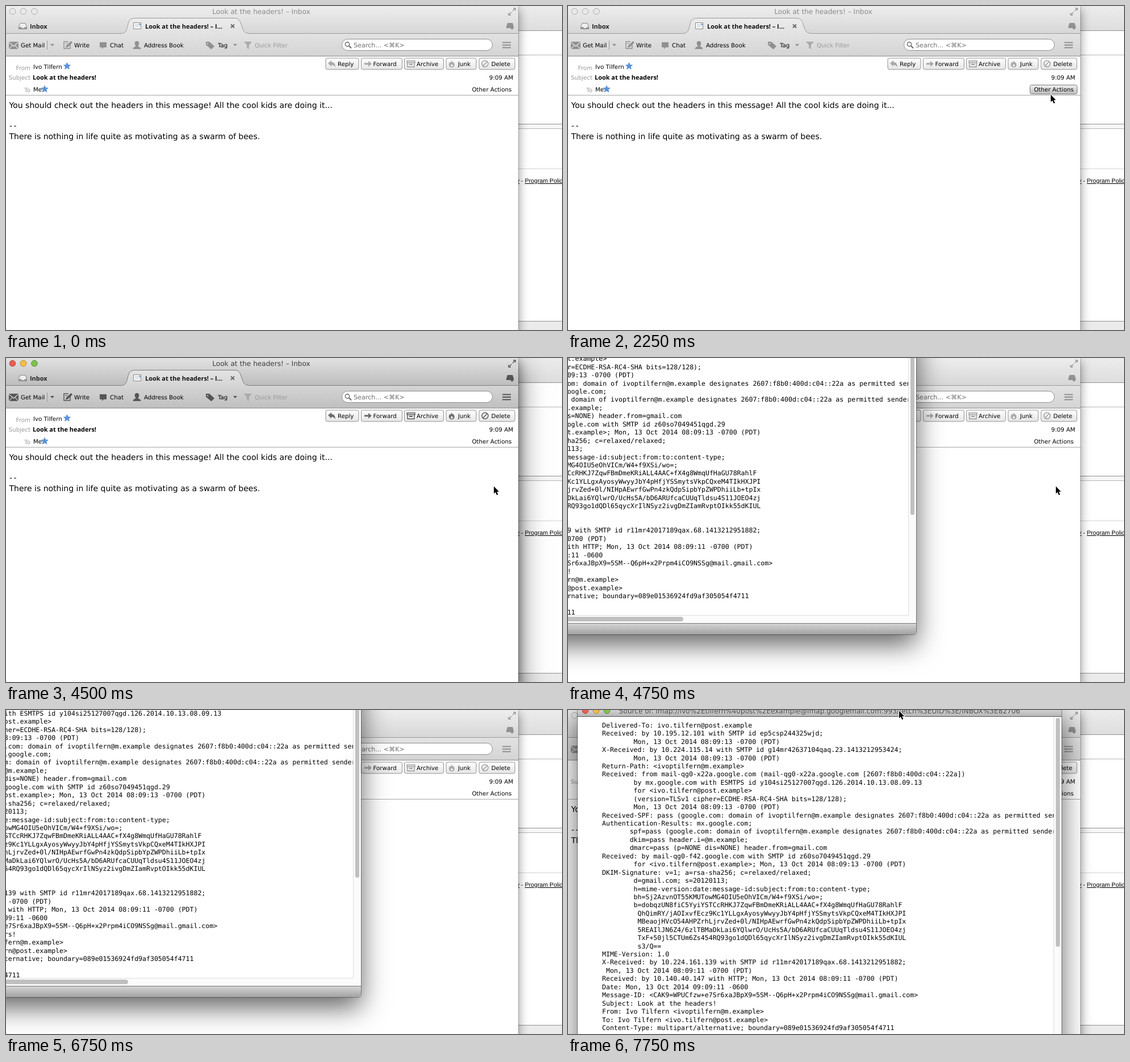
An HTML page that plays this animation: 979 px wide and 572 px high, repeating every 8 s.

```html
<!DOCTYPE html>
<html lang="en">
<head>
<meta charset="utf-8">
<title>Message headers</title>
<style>
html, body { margin: 0; width: 100%; height: 100%; overflow: hidden; background: #fff; }
#stage { position: relative; width: 979px; height: 572px; overflow: hidden;
  font: 10.25px "DejaVu Sans", sans-serif; text-rendering: geometricPrecision; }
#stage > * { position: absolute; }
svg { display: block; }

#main { left: -2px; top: -2px; width: 904px; height: 620px; background: #fff;
  box-shadow: 0 0 0 1px rgba(0,0,0,.18), 0 7px 17px rgba(0,0,0,.45); }
#main > * { position: absolute; left: 2px; top: 2px; }
#main .glow { left: 0; top: 0; width: 904px; height: 620px;
  box-shadow: 0 18px 47px rgba(0,0,0,.6); }
.bold { font: 700 10.95px "Open Sans", sans-serif; }
.title { font-size: 12.1px; }
.body { font-size: 14px; }
.gray { fill: #999; }
.ic { fill: #555; stroke: none; }
.ln { fill: none; stroke: #555; stroke-width: 1.4; }
.btn { fill: url(#btn); stroke: #919191; }

/* focus and hover states */
.on, .dim, .hover, #menu, #menu p, #src, #cursor { animation: 8s step-end infinite; }
.on { --off: 0; animation-name: active; }
.dim { --off: .55; animation-name: active; }
.hover { animation-name: hover; }
@keyframes active { 0%, 59.375% { opacity: var(--off); } 31.25% { opacity: 1; } }
@keyframes hover { 0%, 56.25% { opacity: 0; } 25% { opacity: 1; } }

#menu { left: 813px; top: 157px; width: 190px; height: 144px; padding-top: 2px;
  border-radius: 0 0 5px 5px; background: rgba(255,255,255,.97); font-size: 12.93px;
  box-shadow: 0 0 0 1px rgba(0,0,0,.12), 0 6px 14px rgba(0,0,0,.5); animation-name: menu; }
#menu p { margin: 0; padding-left: 21px; height: 18.3px; line-height: 18.3px; white-space: nowrap; }
#menu hr { margin: 5px 0 6px; border: 0; height: 1px; background: #dcdcdc; }
#menu { --lit: linear-gradient(#5186f6, #1b56e8); }
#menu .conv { animation-name: conv; }
#menu .tab { animation-name: tab; }
#menu .view { animation-name: view; }
@keyframes menu { 0%, 56.25% { opacity: 0; } 31.25% { opacity: 1; } }
@keyframes conv { 0%, 46.875% { color: #000; background: none; } 43.75% { color: #fff; background: var(--lit); } }
@keyframes tab { 0%, 50% { color: #000; background: none; } 46.875% { color: #fff; background: var(--lit); } }
@keyframes view { 0%, 56.25% { color: #000; background: none; } 50% { color: #fff; background: var(--lit); } }

#src { left: 17px; top: -9px; width: 852px; height: 638px; border-radius: 5px; background: #fbfbfb;
  box-shadow: 0 0 0 1px rgba(0,0,0,.35), 0 18px 47px rgba(0,0,0,.62); animation-name: src; }
#src > * { position: absolute; }
#src .bar { width: 852px; height: 20px; border-radius: 5px 5px 0 0; border-bottom: 1px solid #555;
  background: linear-gradient(#e8e8e8, #b6b6b6); }
#src .foot { top: 618px; width: 852px; height: 19px; border-radius: 0 0 5px 5px; border-top: 1px solid #777;
  background: linear-gradient(#d4d4d4, #a2a2a2); }
#src .name { top: 3px; width: 852px; text-align: center; line-height: 16px; white-space: nowrap; color: #4c4c4c; }
#src .doc { top: 21px; width: 838px; height: 583px; overflow: hidden; background: #fff;
  border: solid #ddd; border-width: 0 1px 1px 0; }
#src .thumb { border-radius: 4px; background: #c0c0c0; }
pre { margin: 7.8px 0 0 43px; font: 11.55px/14.43px "DejaVu Sans Mono", monospace; }
@keyframes src {
  0% { opacity: 0; }
  59.375% { opacity: 1; transform: translate(-256px, -141px); }
  75% { opacity: 1; transform: translate(-248px, -127px); }
  84.375% { opacity: 1; transform: translate(-244px, -122px); }
  87.5% { opacity: 1; transform: translate(-179px, -60px); }
  90.625% { opacity: 1; transform: translate(-115px, -11px); }
  93.75% { opacity: 1; transform: translate(-42px, -4px); }
  96.875%, 100% { opacity: 1; transform: none; }
}

#cursor { left: 0; top: 0; overflow: visible; animation-name: cursor; }
@keyframes cursor {
  0% { opacity: 0; }
  6.25% { opacity: 1; transform: translate(848px, 352px); }
  9.375% { opacity: 1; transform: translate(827px, 178px); }
  12.5% { opacity: 1; transform: translate(832px, 165px); }
  18.75% { opacity: 1; transform: translate(830px, 170px); }
  21.875% { opacity: 1; transform: translate(847px, 164px); }
  25% { opacity: 1; transform: translate(848px, 156px); }
  28.125% { opacity: 1; transform: translate(848px, 155px); }
  43.75% { opacity: 1; transform: translate(850px, 174px); }
  46.875% { opacity: 1; transform: translate(854px, 220px); }
  50% { opacity: 1; transform: translate(856px, 230px); }
  56.25% { opacity: 1; transform: translate(857px, 225px); }
  65.625% { opacity: 1; transform: translate(713px, 140px); }
  68.75% { opacity: 1; transform: translate(631px, 96px); }
  75% { opacity: 0; }
  90.625% { opacity: 1; transform: translate(464px, -11px); }
  93.75% { opacity: 1; transform: translate(539px, -4px); }
  96.875%, 100% { opacity: 1; transform: translate(581px, 0); }
}
</style>
</head>
<body>
<div id="stage">

<svg width="979" height="572">
  <defs>
    <linearGradient id="page" x2="0" y2="1"><stop stop-color="#ececec"/><stop offset="1" stop-color="#dedede"/></linearGradient>
  </defs>
  <path fill="#fff" d="M880 0h99v572h-99z"/>
  <path fill="url(#page)" d="M880 0h99v43h-99z"/>
  <path fill="#f6f6f6" d="M880 209h99v7h-99z"/>
  <path fill="#ebebeb" d="M880 557h99v15h-99z"/>
  <path stroke="#8f8f8f" d="M880 43.5h99M880 208.5h99M880 556.5h99"/>
  <path stroke="#b5b5b5" d="M880 86.5h99M880 216.5h99"/>
  <path stroke="#d2d2d2" d="M880 287.5h99"/>
  <text x="898.8" y="312" font-family="Liberation Sans, sans-serif" font-size="10.6"><tspan text-decoration="underline">y</tspan> - <tspan text-decoration="underline">Program Policies</tspan></text>
</svg>

<div id="main">
  <div class="glow on"></div>
  <svg width="902" height="572">
    <defs>
      <linearGradient id="top" x2="0" y2="1"><stop stop-color="#eee"/><stop offset="1" stop-color="#d6d6d6"/></linearGradient>
      <linearGradient id="topOn" x2="0" y2="1"><stop stop-color="#e2e2e2"/><stop offset="1" stop-color="#bcbcbc"/></linearGradient>
      <linearGradient id="tool" x2="0" y2="1"><stop stop-color="#ececec"/><stop offset="1" stop-color="#d4d4d4"/></linearGradient>
      <linearGradient id="toolOn" x2="0" y2="1"><stop stop-color="#e4e4e4"/><stop offset="1" stop-color="#bfbfbf"/></linearGradient>
      <linearGradient id="btn" x2="0" y2="1"><stop stop-color="#fefefe"/><stop offset="1" stop-color="#e6e6e6"/></linearGradient>
      <linearGradient id="btnOn" x2="0" y2="1"><stop stop-color="#f0f0f0"/><stop offset="1" stop-color="#bdbdbd"/></linearGradient>
      <path id="strip" d="M-2 48.5H202C211 48.5 212 43 214 36C216 26 218 21.5 228 21.5H403C412 21.5 413 30 416 38C418 45 421 48.5 430 48.5H905V88.5H-2Z"/>
      <path id="star" d="M0-6L1.7-2L6-1.7L2.8 1.1L3.8 5.4L0 3.1L-3.8 5.4L-2.8 1.1L-6-1.7L-1.7-2Z" fill="#5b94e0" stroke="#3a6fc0" stroke-width=".6"/>
    </defs>

    <path fill="#fff" d="M0 0h902v572H0z"/>
    <path fill="url(#top)" d="M0 0h902v49H0z"/>
    <use href="#strip" fill="url(#tool)" stroke="#9a9a9a"/>
    <g fill="#e9e9e9" stroke="#a8a8a8"><circle cx="11.5" cy="9.5" r="5.3"/><circle cx="30.5" cy="9.5" r="5.3"/><circle cx="50" cy="9.5" r="5.3"/></g>
    <g class="on">
      <path fill="url(#topOn)" d="M0 0h902v49H0z"/>
      <use href="#strip" fill="url(#toolOn)" stroke="#7c7c7c"/>
      <g stroke-width=".9"><circle cx="11.5" cy="9.5" r="5.3" fill="#ea5d52" stroke="#a83c34"/><circle cx="30.5" cy="9.5" r="5.3" fill="#f3bd48" stroke="#ab7d22"/><circle cx="50" cy="9.5" r="5.3" fill="#7fc24b" stroke="#4e8428"/></g>
    </g>
    <path stroke="#8a8a8a" d="M0 88.5h902"/>

    <text class="title dim" x="449.5" y="14" text-anchor="middle" fill="#3c3c3c">Look at the headers! – Inbox</text>
    <text class="bold" x="42" y="39.5" fill="#222">Inbox</text>
    <text class="bold" x="245" y="39.5" fill="#111">Look at the headers! – I…</text>

    <!-- tab strip icons -->
    <path d="M25 30.5h9l2.500 6v4H22.500v-4z" fill="#eee" stroke="#888"/><path d="M23 37h4l1 2h4l1-2h3v3H23z" fill="#999"/>
    <path d="M224.500 29.500h13v11h-13z" fill="#fafafa" stroke="#888"/><path d="M227 33h6M227 36h8" stroke="#aab8cc"/><path d="M234 31h3v3h-3z" fill="#8fb1dc"/>
    <path d="M396 32.500l6 6m0-6l-6 6" stroke="#666" stroke-width="1.900"/>
    <g class="dim">
      <path class="ic" d="M883 30h9l2 6v3h-13v-3zM888 39h6l-3 3z"/>
      <path class="ln" stroke-width="1" d="M892 9l5-5m-4 0h4v4M890 11l-5 5m0-4v4h4"/>
    </g>

    <!-- toolbar -->
    <g class="dim">
      <path class="ic" d="M5 63h17l-8.500 7zM5 64.500l5.500 5L5 75zM22 64.500l-5.500 5L22 75zM11.300 70.200l2.200 1.800 2.200-1.800L21 76H6z"/>
      <path class="ic" d="M78 67h7l-3.500 4zM400 67h7l-3.500 4z"/>
      <path class="ln" d="M113 68v7h-11V63h8"/><path class="ic" d="M106 70l8.500-8 2.500 2.500-8 8-4 1zM104 66h4v1h-4z"/>
      <path class="ic" d="M165 64h12v9h-5l-3 3v-3h-4z"/>
      <path class="ic" d="M230.500 62c3 0 4 2 3.700 4.500-.2 2-1 3-1.700 4 0 2 5 1.500 5 5.500h-14c0-4 5-3.500 5-5.500-.7-1-1.500-2-1.700-4-.3-2.500.7-4.500 3.700-4.500z"/>
      <path class="ic" fill-rule="evenodd" d="M352 63h6l9 8-5.500 5.500-9.500-8zM355 65.200a1.200 1.200 0 1 0 .1 0z"/>
      <path class="ln" stroke-width="2.200" d="M874 64.500h15M874 69h15M874 73.500h15" style="stroke-width:2"/>
    </g>
    <path d="M72.500 61v16" stroke="#999"/>
    <path d="M419 63h14l-5.200 6v7l-3.600-2v-5z" fill="#aaa"/>
    <text x="26" y="73">Get Mail</text>
    <text x="120" y="73">Write</text>
    <text x="183" y="73">Chat</text>
    <text x="243" y="73">Address Book</text>
    <text x="373" y="73">Tag</text>
    <text x="438" y="73" fill="#999">Quick Filter</text>
    <rect x="591.500" y="58.500" width="265" height="20" rx="10" fill="#fff" stroke="#8e8e8e"/>
    <g fill="none" stroke="#666" stroke-width="1.400"><circle cx="601" cy="67.500" r="3.700"/><path d="M604 70.500l4 4" stroke-width="2"/></g>
    <text x="612" y="73" font-size="11.200" fill="#707070">Search... &lt;⌘K&gt;</text>

    <!-- message header -->
    <path stroke="#a6a6a6" d="M0 157.500h902"/>
    <g class="gray" text-anchor="end"><text x="43" y="112.500">From</text><text x="43" y="130">Subject</text><text x="43" y="152">To</text></g>
    <text x="48" y="110.500">Ivo Tilfern</text><use href="#star" x="107.500" y="106"/>
    <text class="bold" x="47" y="130">Look at the headers!</text>
    <text x="48" y="151">Me</text><use href="#star" x="68" y="146.500"/>
    <text x="893" y="130" text-anchor="end">9:09 AM</text>
    <rect class="hover" x="813.500" y="139.500" width="83" height="16" rx="3" fill="url(#btnOn)" stroke="#7b7b7b"/>
    <text x="820.500" y="151">Other Actions</text>

    <g class="btn">
      <rect x="563" y="92" width="58" height="20" rx="3"/><rect x="625.500" y="92" width="72" height="20" rx="3"/>
      <rect x="701.500" y="92" width="69" height="20" rx="3"/><rect x="775" y="92" width="53" height="20" rx="3"/>
      <rect x="833" y="92" width="63" height="20" rx="3"/>
    </g>
    <g class="dim">
      <path class="ic" d="M567 101l6-5v3c5 0 7 4 7 9-2-3-3.500-4-7-4v3z" opacity=".85"/>
      <path class="ic" d="M631 100.500h7V97l6 5-6 5v-3.500h-7z" opacity=".85"/>
      <path class="ln" d="M707 100v7.500h12V100M706 97h14v3h-14z"/><path class="ic" d="M710 102h6v2h-6z"/>
      <path class="ic" fill-rule="evenodd" d="M784 96c1 3 4 3 5 5 2 4-.5 7.500-4 7.500s-6-3-5-6.500c.5-1.500 1-2 1-3.500 1 .5 1.500 1 2 2 1-1.500 1-3 1-4.500zM785 102.500c-3 2-2.500 4.500 0 4.500s3-2.500 0-4.500z" opacity=".85"/>
      <g class="ln"><circle cx="843.500" cy="102" r="5.500"/><path d="M839.700 106l7.600-8"/></g>
    </g>
    <text x="584" y="106">Reply</text>
    <text x="646.500" y="106">Forward</text>
    <text x="723" y="106">Archive</text>
    <text x="796" y="106">Junk</text>
    <text x="854.500" y="106">Delete</text>

    <g class="body">
      <text x="5.500" y="180">You should check out the headers in this message! All the cool kids are doing it...</text>
      <text x="6" y="216" letter-spacing="2.500">--</text>
      <text x="5.500" y="235">There is nothing in life quite as motivating as a swarm of bees.</text>
    </g>
  </svg>
</div>

<div id="menu">
  <p class="conv">Open in Conversation</p>
  <p>Open in New Window</p>
  <p class="tab">Open in New Tab</p>
  <p class="view">View Source</p>
  <hr>
  <p>Mark as Unread</p>
  <p>Save as...</p>
  <p>Print...</p>
</div>

<div id="src">
  <div class="bar"></div>
  <svg width="70" height="20" stroke-width=".9"><circle cx="13.500" cy="10" r="5.300" fill="#ea5d52" stroke="#a83c34"/><circle cx="32.500" cy="10" r="5.300" fill="#f3bd48" stroke="#ab7d22"/><circle cx="51.500" cy="10" r="5.300" fill="#7fc24b" stroke="#4e8428"/></svg>
  <div class="name title">Source of: imap://ivo%2Etilfern%40post%2Eexample@imap.googlemail.com:993/fetch%3EUID%3E/INBOX%3E82706</div>
  <div class="doc"><pre>Delivered-To: ivo.tilfern@post.example
Received: by 10.195.12.101 with SMTP id ep5csp244325wjd;
        Mon, 13 Oct 2014 08:09:13 -0700 (PDT)
X-Received: by 10.224.115.14 with SMTP id g14mr42637104qaq.23.1413212953424;
        Mon, 13 Oct 2014 08:09:13 -0700 (PDT)
Return-Path: &lt;ivoptilfern@m.example&gt;
Received: from mail-qg0-x22a.google.com (mail-qg0-x22a.google.com [2607:f8b0:400d:c04::22a])
        by mx.google.com with ESMTPS id y104si25127007qgd.126.2014.10.13.08.09.13
        for &lt;ivo.tilfern@post.example&gt;
        (version=TLSv1 cipher=ECDHE-RSA-RC4-SHA bits=128/128);
        Mon, 13 Oct 2014 08:09:13 -0700 (PDT)
Received-SPF: pass (google.com: domain of ivoptilfern@m.example designates 2607:f8b0:400d:c04::22a as permitted sender)
Authentication-Results: mx.google.com;
       spf=pass (google.com: domain of ivoptilfern@m.example designates 2607:f8b0:400d:c04::22a as permitted sender)
       dkim=pass header.i=@m.example;
       dmarc=pass (p=NONE dis=NONE) header.from=gmail.com
Received: by mail-qg0-f42.google.com with SMTP id z60so7049451qgd.29
        for &lt;ivo.tilfern@post.example&gt;; Mon, 13 Oct 2014 08:09:13 -0700 (PDT)
DKIM-Signature: v=1; a=rsa-sha256; c=relaxed/relaxed;
        d=gmail.com; s=20120113;
        h=mime-version:date:message-id:subject:from:to:content-type;
        bh=Sj2AzvnOT55KMUTowMG4OIU5eOhVICm/W4+f9XSi/wo=;
        b=dobqzUN8fiC5YyiYSTCcRHKJ7ZqwFBmDmeKRiALL4AAC+fX4g8WmqUfHaGU78RahlF
         QhQimRY/jAOIxvfEcz9Kc1YLLgxAyosyWwyyJbY4pHfjYSSmytsVkpCQxeM4TIkHXJPI
         MBeaojHVcO54AHPZrhLjrvZed+0l/NIHpAEwrfGwPn4zkQdpSipbYpZWPDhiiLb+tpIx
         5REAIlJN6Z4/6zlTBMaDkLai6YQlwrO/UcHs5A/bD6ARUfcaCUUqTldsu4S11JOEO4zj
         TxF+50jl5CTUm6Zs454RQ93go1dQDl65qycXrIlNSyz2ivgDmZIamRvptOIkk55dKIUL
         s3/Q==
MIME-Version: 1.0
X-Received: by 10.224.161.139 with SMTP id r11mr42017189qax.68.1413212951882;
 Mon, 13 Oct 2014 08:09:11 -0700 (PDT)
Received: by 10.140.40.147 with HTTP; Mon, 13 Oct 2014 08:09:11 -0700 (PDT)
Date: Mon, 13 Oct 2014 09:09:11 -0600
Message-ID: &lt;CAK9=WPUCfzw+e7Sr6xaJBpX9=5SM--Q6pH+x2Prpm4iCO9NSSg@mail.gmail.com&gt;
Subject: Look at the headers!
From: Ivo Tilfern &lt;ivoptilfern@m.example&gt;
To: Ivo Tilfern &lt;ivo.tilfern@post.example&gt;
Content-Type: multipart/alternative; boundary=089e01536924fd9af305054f4711

--089e01536924fd9af305054f4711</pre></div>
  <div class="thumb" style="left:842px;top:23px;width:7px;height:404px"></div>
  <div class="thumb" style="left:3px;top:607px;width:439px;height:8px"></div>
  <div class="foot"></div>
</div>

<svg id="cursor" width="13" height="19">
  <path d="M2 1.500V14.500L4.900 11.800L7.200 17L9.400 16.100L7.200 10.900H11Z" stroke="#fff" stroke-width="1.800" paint-order="stroke"/>
</svg>

</div>
</body>
</html>
```
